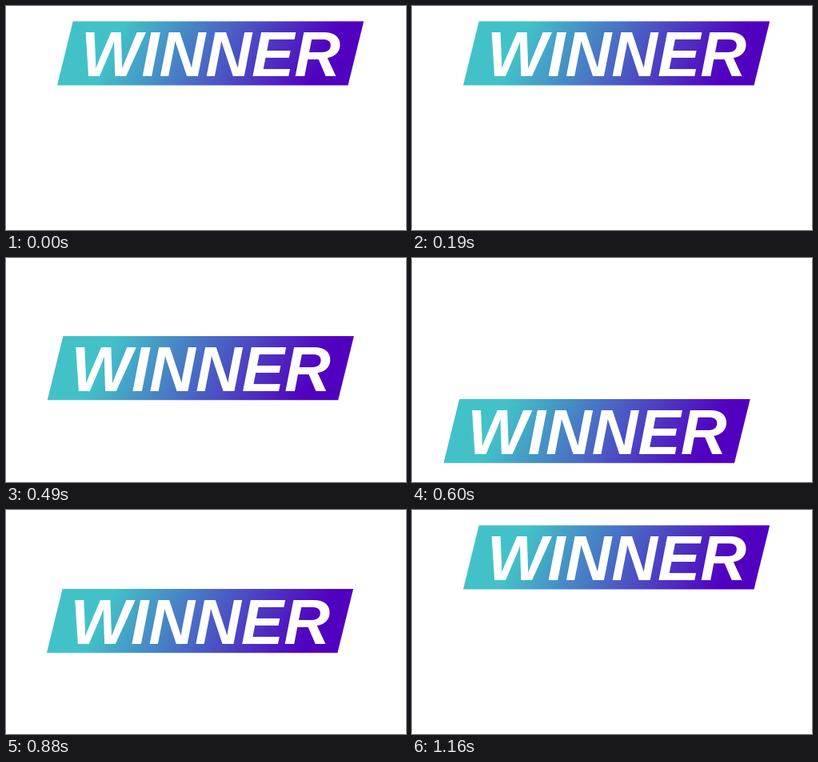
Recreate the animation shown at these times as an HTML page with a canvas. Size 500 px wide and 281 px high, loop 1.2 s.

```html
<!DOCTYPE html>
<html lang="en">
<head>
<meta charset="utf-8">
<title>Winner</title>
<style>
html, body { margin: 0; width: 100%; height: 100%; overflow: hidden; background: #fff; }
canvas { display: block; width: 500px; height: 281px; }
</style>
</head>
<body>
<canvas id="stage" width="500" height="281"></canvas>
<script>
const ctx = document.getElementById('stage').getContext('2d');
const LOOP = 1200;
const WIDTH = 363.5, HEIGHT = 80.3, SLANT = 19.7;

// The banner jumps between these places: start time and top-left corner
const steps = [
  { at: 0, x: 83.7, y: 19.2 },
  { at: 320, x: 71.4, y: 98 },
  { at: 600, x: 59.2, y: 177 },
  { at: 880, x: 70.6, y: 99 },
  { at: 1160, x: 83.7, y: 19.2 }
];

const fill = ctx.createLinearGradient(72, -15, 292, 95);
fill.addColorStop(0, '#42c2c8');
fill.addColorStop(1, '#5200c0');

function drawBanner(x, y) {
  ctx.save();
  ctx.translate(x, y);
  ctx.fillStyle = fill;
  ctx.beginPath();
  ctx.moveTo(0, 0);
  ctx.lineTo(WIDTH, 0);
  ctx.lineTo(WIDTH - SLANT, HEIGHT);
  ctx.lineTo(-SLANT, HEIGHT);
  ctx.closePath();
  ctx.fill();

  ctx.font = 'italic bold 80px "Liberation Sans", Arial, sans-serif';
  ctx.fillStyle = '#fff';
  const ink = ctx.measureText('WINNER');
  const middle = (ink.actualBoundingBoxRight - ink.actualBoundingBoxLeft) / 2;
  ctx.fillText('WINNER', 174.8 - middle, 69);
  ctx.restore();
}

function frame(now) {
  const t = now % LOOP;
  const step = steps.filter(s => s.at <= t).pop() || steps[0];
  ctx.fillStyle = '#fff';
  ctx.fillRect(0, 0, 500, 281);
  drawBanner(step.x, step.y);
}

const start = performance.now();
function tick() {
  frame(performance.now() - start);
  requestAnimationFrame(tick);
}
tick();
</script>
</body>
</html>
```
